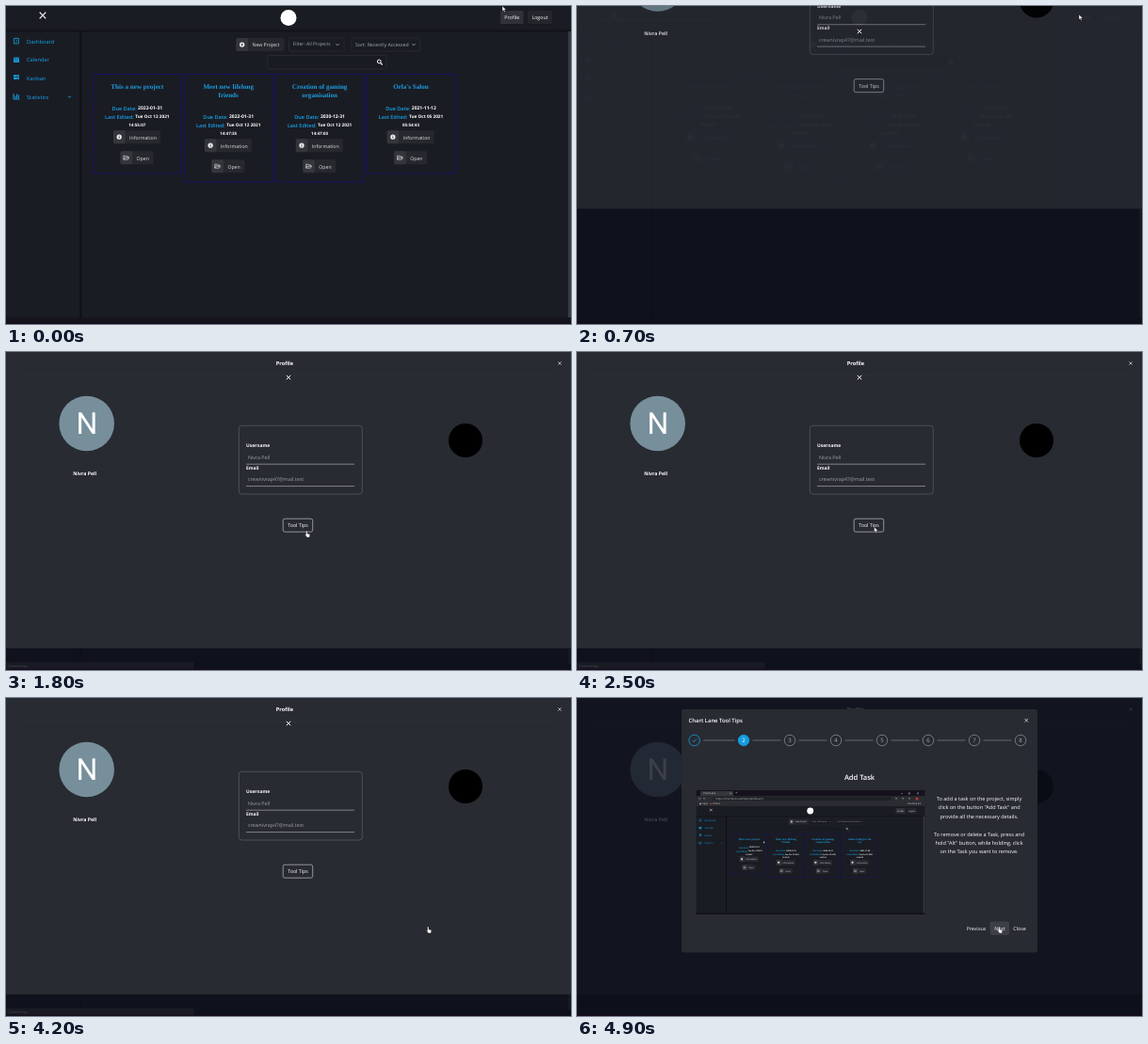
Write an HTML page that moves like this. It is 600 px wide and 338 px high and loops after 5000 ms.

```html
<!DOCTYPE html>
<html lang="en">
<head>
<meta charset="utf-8">
<title>Project dashboard</title>
<style>
  html, body { margin: 0; width: 100%; height: 100%; overflow: hidden; background: #1a1c23; }
  svg { display: block; width: 100%; height: 100%; }
  text { font-family: "Open Sans", "Noto Sans", sans-serif; dominant-baseline: central; text-rendering: geometricPrecision; }
  .title { font-family: "Liberation Serif", serif; font-weight: 700; }
</style>
</head>
<body>
<svg id="stage" viewBox="0 0 600 338"></svg>
<script>
const LOOP = 5000;
const BLUE = '#14a3ea', ACCENT = '#169de0', PANEL = '#282b32', BACKDROP = '#0d101b';
const USER = 'Nivra Pell', EMAIL = 'crewnivrap47@mail.test';

// Drawing helpers
const text = (x, y, s, size = 5.3, fill = '#fff', more = '') =>
  `<text x="${x}" y="${y}" font-size="${size}" fill="${fill}" ${more}>${s}</text>`;
const mid = (x, y, s, size, fill, more = '') => text(x, y, s, size, fill, `text-anchor="middle" ${more}`);
const semibold = 'font-weight="600"', bold = 'font-weight="700"';
const rect = (x, y, w, h, fill, r = 0, more = '') =>
  `<rect x="${x}" y="${y}" width="${w}" height="${h}" rx="${r}" fill="${fill}" ${more}/>`;
const circle = (x, y, r, fill, more = '') => `<circle cx="${x}" cy="${y}" r="${r}" fill="${fill}" ${more}/>`;
const line = (d, stroke = '#fff', w = 1) =>
  `<path d="${d}" fill="none" stroke="${stroke}" stroke-width="${w}"/>`;
const cross = (x, y, r, w = 1, c = '#fff') =>
  line(`M${x - r} ${y - r}l${2 * r} ${2 * r}m0 ${-2 * r}l${-2 * r} ${2 * r}`, c, w);
const caret = (x, y, c) => line(`M${x - 1.6} ${y - .8}l1.6 1.6 1.6-1.6`, c, .9);
const group = (id, body) => `<g id="${id}">${body}</g>`;

const ARROW = '<path d="M0 0v5.6l1.3-1.2 1 2.2 1-.5-1-2h1.9z" fill="#fff" stroke="#000" stroke-width=".4"/>';
const HAND = '<path d="M1.4 0q.8 0 .8.8v2.1l2.2.6q.7.2.6 1L4.5 7H1.8L-.3 4.3q.3-.9 1 0V.8Q.7 0 1.4 0z" fill="#fff" stroke="#111" stroke-width=".4"/>';

const folder = (x, y) => line(`M${x - 2.8} ${y + 2}v-4h2l.8.8h2.2v1.2m-5 2l1.2-2h4.6l-1.2 2z`, '#ddd', .7);
const info = (x, y) => circle(x, y, 2.6, '#eee') + rect(x - .4, y - .4, .8, 1.8, '#222') + rect(x - .4, y - 1.6, .8, .8, '#222');
const plus = (x, y) => circle(x, y, 2.6, '#fff') + line(`M${x - 1.5} ${y}h3m-1.5-1.5v3`, '#222', .7);

function iconButton(x, y, w, label, icon) {
  return rect(x, y - 7, w, 14, '#26282e', 1.5) + rect(x, y - 7, 12.5, 14, '#34363c', 1.5) +
    icon(x + 6.2, y) + text(x + 17, y + .3, label, 5.2, '#e4e5e8');
}

function card(index, { title, due, edited, time }) {
  const left = 92.5 + index * 96.9, cx = left + 46.8;
  const shift = (title.length - 1) * 9;
  const label = s => `<tspan font-size="5.5" font-weight="600" fill="${BLUE}">${s}: </tspan>`;
  return rect(left, 72.5, 93.6, 105.5 + shift, 'none', 0, 'stroke="#1b0f8c" stroke-width=".8" stroke-dasharray="2 .5"') +
    title.map((s, i) => mid(cx, 86.3 + i * 9, s, 7.1, '#1c9ce0', 'class="title"')).join('') +
    mid(cx, 109 + shift, label('Due Date') + due, 5, '#fff', bold) +
    mid(cx, 118.3 + shift, label('Last Edited') + edited, 4.7, '#fff', bold) +
    mid(cx, 127.2 + shift, time, 4.5, '#fff', bold) +
    iconButton(cx - 25.3, 139.2 + shift, 50, 'Information', info) +
    iconButton(cx - 17.8, 161.2 + shift, 35, 'Open', folder);
}

const project = (title, due, edited, time) => ({ title: title.split('|'), due, edited, time });
const fresh = project('This a new project', '2022-01-31', 'Tue Oct 12 2021', '14:55:07');
const friends = project('Meet new lifelong|friends', '2022-01-31', 'Tue Oct 12 2021', '14:47:35');
const gaming = project('Creation of gaming|organisation', '2030-12-31', 'Tue Oct 12 2021', '14:47:03');
const salon = project("Orla's Salon", '2021-11-12', 'Tue Oct 05 2021', '05:54:43');
const styling = project('Salon styling for the|tea', '2021-11-20', 'Tue Oct 12 2021', '14:46:28');

function sidebar() {
  const icons = [
    line('M8.4 34.4h5v5.6h-5zM10.3 35.8l1.5 1.4-1.5 1.4', BLUE, .8),
    rect(8, 54.5, 6, 5.6, BLUE, .5) + line('M8 56h6M9.5 53.6v1.5M12.5 53.6v1.5M9 58.2h4', '#1a1c23', .5),
    rect(8, 73.2, 6, 2, BLUE) + rect(8, 75.8, 6, 2.2, BLUE) + line('M11 74.2h2M11 77h2', '#1a1c23', .5),
    line('M8 93v6h6.5M10 98v-2.5M11.7 98v-4.5M13.4 98v-3.5', BLUE, 1)
  ];
  return ['Dashboard', 'Calendar', 'Kanban', 'Statistics']
    .map((s, i) => icons[i] + text(22, [38, 57.3, 76.5, 96.7][i], s, 5.7, BLUE)).join('') + caret(67.5, 96.5, BLUE);
}

function dashboard(projects) {
  const outline = 'stroke="#2b2d34" stroke-width=".8"';
  return rect(0, 0, 600, 338, '#1a1c23') +
    rect(0, 25.6, 600, 1.6, '#111217') + rect(78, 27, 2.5, 305, '#111217') +
    rect(597, 27, 3, 304, '#3a3c41') + rect(0, 331.5, 600, 6.5, '#15131c') +
    cross(39, 10, 3.3, 1.2) + circle(300, 12.5, 8.5, '#fff') +
    rect(525, 5, 24.5, 14, '#303238', 1.5) + mid(537.2, 12.4, 'Profile', 5.3) +
    rect(554, 5, 26, 14, '#24262c', 1.5) + mid(567, 12.4, 'Logout', 5.3) +
    sidebar() +
    iconButton(244.5, 41, 51, 'New Project', plus) +
    rect(300.5, 34, 58.5, 14, 'none', 1.5, outline) + text(304.7, 41.3, 'Filter: All Projects', 5, '#a4a9b3') + caret(352, 41, '#a4a9b3') +
    rect(367, 34, 73, 14, 'none', 1.5, outline) + text(371, 41.3, 'Sort: Recently Accessed', 5.2, '#a4a9b3') + caret(433, 41, '#a4a9b3') +
    rect(278, 52.5, 126, 14.5, '#191b22', 1.5, outline) +
    circle(396.3, 59, 1.9, 'none', 'stroke="#fff" stroke-width="1"') + line('M397.7 60.5l2 2', '#fff', 1.1) +
    projects.map((p, i) => card(i, p)).join('');
}

function drawer() {
  return rect(0, 0, 600, 315, PANEL) +
    mid(296, 12.3, 'Profile', 5.6, '#fff', bold) + cross(588, 12, 1.7, .7, '#ddd') + line('M14 25.3H585', '#31343b', .7) +
    circle(85.7, 76, 29.3, '#778f9b') + mid(85.9, 76.2, 'N', 32, '#fff', 'style="font-family:Roboto,sans-serif"') +
    line('M25 114H143', '#32353c', .6) + mid(83.7, 128.8, USER, 5.2, '#fff', bold) +
    rect(247.3, 78.3, 131, 72.7, 'none', 3, 'stroke="#5d6066" stroke-width=".7"') +
    text(255, 100.3, 'Username', 4.9, '#fff', bold) + text(257, 111.8, USER, 5.3, '#a0a2a7') +
    text(255, 123.8, 'Email', 4.9, '#fff', bold) + text(257, 135.2, EMAIL, 5.3, '#a0a2a7') +
    line('M255 119.2H370M255 142.6H370', '#a6a8ac', .7) +
    circle(488, 94, 18, '#000') +
    rect(294.2, 177.2, 31.5, 14, 'none', 2, 'stroke="#c0c2c6" stroke-width=".7"') + mid(310, 184.4, 'Tool Tips', 5.3);
}

// A browser window holding a reduced copy of the dashboard
function thumbnail(projects, x, y) {
  const icons = [339, 346, 353].map(c => circle(c, 106.8, .8, '#999')).join('');
  return `<g clip-path="url(#shot)">` +
    rect(126.5, 98, 243, 132, '#1a1c23') +
    rect(126.5, 98, 243, 6.2, '#15121e') + rect(131, 99, 35, 5.2, '#35363a', 1) +
    text(134, 101.4, 'Chart Lane', 2.6, '#ddd') + cross(163, 101.4, .7, .4) + text(168, 101.2, '+', 4, '#ccc') +
    line('M344 101.5h2M352 100.7h1.5v1.5h-1.5z', '#bbb', .4) + cross(362, 101.4, .8, .4) +
    rect(126.5, 104.2, 243, 11, '#2b2c31') + line('M129 106.9h2.5M134 106.9h2.5', '#bbb', .5) +
    rect(144, 105, 190, 4, '#202126', 2) + text(147, 107, 'https://chartlane.example/dashboard', 2.9, '#bbb') + icons +
    circle(361, 107, 1.5, '#c33a36') + circle(131, 112.4, .9, '#bbb') + text(133, 112.4, 'Apps', 2.7, '#ccc') +
    circle(142, 112.4, .9, '#c33a36') + text(144, 112.4, 'Videos', 2.7, '#ccc') +
    text(351, 112.4, 'Reading list', 2.7, '#ccc') +
    `<g transform="translate(126.5 115) scale(.404)">${dashboard(projects)}</g>` +
    rect(126.5, 228.5, 243, 1.5, '#101116') +
    `<g transform="translate(${x} ${y}) scale(.4)">${ARROW}</g></g>`;
}

function steps(active) {
  const at = i => i ? 128 + i * 49 : 124.7;
  let out = '';
  for (let i = 0; i < 8; i++) {
    const x = at(i), on = i === active, done = i < active;
    const ring = on || done ? ACCENT : '#858b94';
    out += circle(x, 45, 5.8, on ? ACCENT : 'none', `stroke="${ring}" stroke-width=".8"`);
    out += done ? line(`M${x - 2} 45l1.5 1.6 2.8-3.2`, ACCENT, .8) : mid(x, 45.2, i + 1, 6, on ? '#fff' : '#a4a9b3');
    if (i < 7) out += line(`M${x + 9.5} 45H${at(i + 1) - 9.5}`, '#7c8189', .7);
  }
  return out;
}

function tip(active, title, lines, shot) {
  return steps(active) + mid(300, 85.3, title, 7.5, '#fff', semibold) + shot +
    lines.map((s, i) => mid(427, 107 + i * 9.4, s, 5.5, '#fff')).join('');
}

function dialog() {
  return rect(111, 12, 378, 258.5, PANEL, 2.5) +
    text(118.5, 24.2, 'Chart Lane Tool Tips', 5.9, '#fff', semibold) + cross(477.2, 23.7, 1.8, .8, '#ddd') +
    group('tip1', tip(0, 'Create Project',
      ['To create a new project, simply click', 'on the button "New Project" on the', 'Dashboard'],
      thumbnail([friends, gaming, styling], 232, 131)) + rect(460, 237.5, 20.5, 14.5, '#31343b', 2)) +
    group('tip2', tip(1, 'Add Task',
      ['To add a task on the project, simply', 'click on the button "Add Task" and', 'provide all the necessary details.', '',
        'To remove or delete a Task, press and', 'hold "Alt" button, while holding, click', 'on the Task you want to remove.'],
      thumbnail([fresh, friends, gaming, styling], 198, 152)) + rect(438.5, 237.5, 20.5, 14.5, '#3c3f46', 2)) +
    group('previous', mid(424, 245, 'Previous', 5.2, '#fff')) +
    mid(449, 245, 'Next', 5.3, '#fff') + mid(470, 245, 'Close', 5.3, '#fff');
}

document.getElementById('stage').innerHTML =
  `<clipPath id="shot">${rect(126.5, 98, 243, 132, '#fff')}</clipPath>` +
  dashboard([fresh, friends, gaming, salon]) +
  group('mask', rect(0, 0, 600, 338, BACKDROP)) +
  group('drawer', drawer()) +
  group('toggle', cross(300, 27, 2.2, 1)) +
  group('status', rect(0, 329.7, 199.5, 8.3, '#191a23') + text(2, 334, 'Connecting...', 3.8, '#484952')) +
  group('dialogMask', rect(0, 0, 600, 338, BACKDROP)) +
  group('dialog', dialog()) +
  rect(0, 336.6, 600, 1.4, '#160d1e') +
  group('arrow', ARROW) + group('hand', HAND);

// Each track lists [start time, value]; values hold until the next start.
const valueAt = (track, t) => track.reduce((v, [start, value]) => t >= start ? value : v, track[0][1]);
const opacities = {
  mask: [[0, 0], [500, .45], [700, .8]],
  drawer: [[0, 0], [700, .8], [800, 1]],
  toggle: [[0, 0], [700, 1]],
  status: [[0, 0], [1100, .6], [1200, 1], [4400, 0]],
  dialogMask: [[0, 0], [4400, .78], [4500, .8]],
  dialog: [[0, 0], [4400, 1]],
  tip1: [[0, 1], [4700, 0]],
  tip2: [[0, 0], [4700, 1]],
  previous: [[0, .3], [4700, .65], [4900, 1]]
};
const pointer = [
  [0, ['arrow', 527, 0]], [300, ['hand', 532.5, 9]], [500, ['arrow', 533, 9]],
  [1800, ['hand', 317.8, 190]], [2400, ['hand', 316, 187.5]], [2500, ['arrow', 315.5, 186]],
  [4200, ['hand', 446.8, 243]]
];
const cursors = ['arrow', 'hand'];
const parts = Object.fromEntries([...Object.keys(opacities), ...cursors].map(id => [id, document.getElementById(id)]));

function draw(t) {
  for (const id in opacities) {
    const opacity = valueAt(opacities[id], t);
    parts[id].setAttribute('opacity', opacity);
    parts[id].setAttribute('display', opacity ? 'inline' : 'none');
  }
  parts.drawer.setAttribute('transform', `translate(0 ${t < 800 ? -99.5 : 0})`);
  const [shape, x, y] = valueAt(pointer, t);
  for (const id of cursors) parts[id].setAttribute('display', id === shape ? 'inline' : 'none');
  parts[shape].setAttribute('transform', `translate(${x} ${y})`);
}

function tick() {
  draw(performance.now() % LOOP);
  requestAnimationFrame(tick);
}
tick();
</script>
</body>
</html>
```
